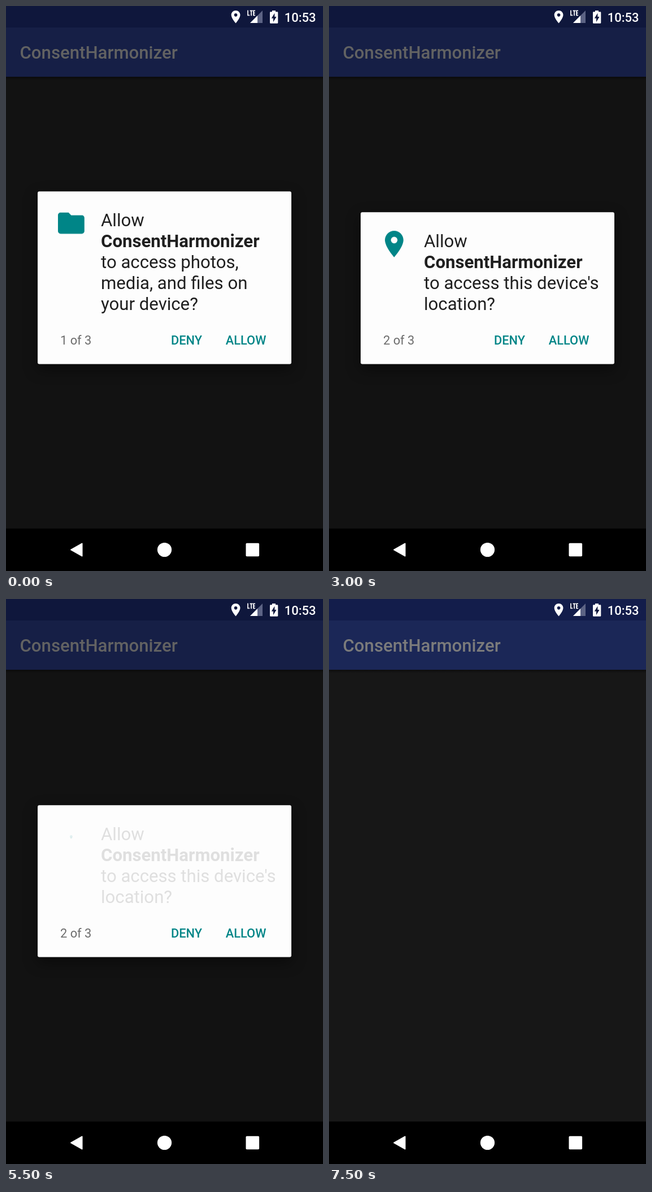
Recreate the animation shown at these times as an HTML page. Size 561 by 998 pixels, loop 8 s.

```html
<!DOCTYPE html>
<html lang="en">
<head>
<meta charset="utf-8">
<title>Permission dialogs</title>
<style>
  html, body { margin: 0; width: 100%; height: 100%; overflow: hidden; background: #000; }
  svg { display: block; width: 561px; height: 998px; font-family: Roboto, sans-serif; }
  .title, .button, .clock { font-weight: 500; }
  .title { font-size: 31.17px; fill: #7b7b7b; }
  .clock { font-size: 22px; fill: #fff; }
  .message { font-size: 31.17px; fill: #1f1f1f; }
  .message .app { font-weight: 700; }
  .button, .count { font-size: 21.8px; }
  .button, .icon { fill: #008587; }
  .count { fill: #6b6b6b; }
  .card { fill: #fdfdfd; filter: drop-shadow(0 9px 13px rgba(0, 0, 0, .45)); }
  .icon { transform-box: fill-box; transform-origin: center; }

  /* Everything changes in hard half-second steps: 6.25% each. */
  .dim, .dialog, .message, .icon, .press, .touch, .slide { animation: 8s step-end infinite; }
  .dim { animation-name: dim; }
  .files { animation-name: files; }
  .place { animation-name: place; }
  .calls { animation-name: calls; }
  .files .message { animation-name: fade1; }
  .place .message { animation-name: fade2; }
  .files .icon { animation-name: shrink1; }
  .place .icon { animation-name: shrink2; }
  .press { animation-name: press; }
  .slide { animation-name: slide; }
  .touch { animation-name: touch; }

  @keyframes dim { 0% { opacity: .2 } 93.75%, 100% { opacity: 0 } }
  @keyframes files { 0% { visibility: visible } 37.5%, 100% { visibility: hidden } }
  @keyframes place { 0% { visibility: hidden } 37.5% { visibility: visible } 75%, 100% { visibility: hidden } }
  @keyframes calls { 0% { visibility: hidden } 75% { visibility: visible } 93.75%, 100% { visibility: hidden } }
  @keyframes fade1 { 0% { opacity: 1 } 31.25%, 100% { opacity: .13 } }
  @keyframes fade2 { 0% { opacity: 1 } 68.75%, 100% { opacity: .13 } }
  @keyframes shrink1 { 0% { opacity: 1; transform: none } 31.25%, 100% { opacity: .16; transform: scale(.13) } }
  @keyframes shrink2 { 0% { opacity: 1; transform: none } 68.75%, 100% { opacity: .16; transform: scale(.13) } }
  @keyframes press {
    0% { opacity: 0 } 31.25% { opacity: 1 } 37.5% { opacity: 0 }
    68.75% { opacity: 1 } 75%, 100% { opacity: 0 }
  }
  @keyframes slide { 0% { transform: translateX(7.5px) } 81.25%, 100% { transform: none } }
  @keyframes touch {
    0% { opacity: 0; transform: translate(409.5px, 582px) }
    62.5% { opacity: 1; transform: translate(409.5px, 582px) }
    68.75% { opacity: 0; transform: translate(324px, 582px) }
    87.5% { opacity: 1; transform: translate(324px, 582px) }
    93.75%, 100% { opacity: 0; transform: translate(324px, 582px) }
  }
</style>
</head>
<body>
<svg viewBox="0 0 561 998">
  <defs>
    <linearGradient id="barShade" x2="0" y2="1">
      <stop stop-opacity=".45"/>
      <stop offset="1" stop-opacity="0"/>
    </linearGradient>
    <path id="pin" d="M12 2C8.13 2 5 5.13 5 9c0 5.25 7 13 7 13s7-7.75 7-13c0-3.87-3.13-7-7-7zm0 9.5a2.5 2.5 0 0 1 0-5 2.5 2.5 0 0 1 0 5z"/>
    <g id="actions">
      <rect class="press" x="376.5" y="561" width="97" height="55.5" rx="3" fill="#e8e8e8"/>
      <text class="button" x="292" y="597.5">DENY</text>
      <text class="button" x="388.7" y="597.5">ALLOW</text>
    </g>
  </defs>

  <!-- App behind the dialogs -->
  <rect width="561" height="998" fill="#171717"/>
  <rect width="561" height="38" fill="#131d4b"/>
  <rect y="38" width="561" height="87" fill="#1b2757"/>
  <rect y="125" width="561" height="6" fill="url(#barShade)"/>
  <text class="title" x="24.5" y="93">ConsentHarmonizer</text>
  <rect class="dim" width="561" height="923"/>

  <!-- Status bar -->
  <g fill="#fff">
    <use href="#pin" transform="translate(393 5.7) scale(1.13)"/>
    <path d="M454 8V30H432Z" fill="#5c6384"/>
    <path d="M445 17V30H432Z"/>
    <path d="M426 6H442V18.5H426Z" fill="#0f173c"/>
    <path d="M428 7.5V16.3H431.2M431.6 8.4H436.6M434.1 8.4V17.2M441 8.4H438V16.3H441M438 12.3H440.6" fill="none" stroke="#fff" stroke-width="1.7"/>
    <path d="M471 8H477V10.3H480A1.3 1.3 0 0 1 481.3 11.6V29.5A1.3 1.3 0 0 1 480 30.8H468.3A1.3 1.3 0 0 1 467 29.5V11.6A1.3 1.3 0 0 1 468.3 10.3H471Z"/>
    <path d="M475.4 12.5L469.8 21.8H473V28.3L478.6 19H475.4Z" fill="#0f173c"/>
    <text class="clock" x="492.7" y="27.5">10:53</text>
  </g>

  <!-- Navigation bar -->
  <rect y="923" width="561" height="75"/>
  <g fill="#fff">
    <path d="M115 960.5L134.5 949.5V971.5Z" stroke="#fff" stroke-width="2" stroke-linejoin="round"/>
    <circle cx="280.5" cy="960.5" r="12.6"/>
    <rect x="424.5" y="948.7" width="23.6" height="23.6" rx="1.8"/>
  </g>

  <g class="dialog files">
    <rect class="card" x="56" y="327.5" width="449" height="305" rx="3"/>
    <g transform="translate(87.3 355.5) scale(2.338)">
      <path class="icon" d="M10 4H4c-1.1 0-2 .9-2 2v12c0 1.1.9 2 2 2h16c1.1 0 2-.9 2-2V8c0-1.1-.9-2-2-2h-8z"/>
    </g>
    <text class="message">
      <tspan x="168" y="389">Allow</tspan>
      <tspan class="app" x="168" y="426">ConsentHarmonizer</tspan>
      <tspan x="168" y="463">to access photos,</tspan>
      <tspan x="168" y="500">media, and files on</tspan>
      <tspan x="168" y="537">your device?</tspan>
    </text>
    <text class="count" x="96" y="597.5">1 of 3</text>
    <use href="#actions"/>
  </g>

  <g class="dialog place">
    <rect class="card" x="56" y="364.3" width="449" height="268.2" rx="3"/>
    <g transform="translate(87.3 392.4) scale(2.338)">
      <use class="icon" href="#pin"/>
    </g>
    <text class="message">
      <tspan x="168" y="426">Allow</tspan>
      <tspan class="app" x="168" y="463">ConsentHarmonizer</tspan>
      <tspan x="168" y="500">to access this device's</tspan>
      <tspan x="168" y="537">location?</tspan>
    </text>
    <text class="count" x="96" y="597.5">2 of 3</text>
    <use href="#actions"/>
  </g>

  <g class="dialog calls">
    <rect class="card" x="56" y="364.3" width="449" height="268.2" rx="3"/>
    <g class="slide">
      <g transform="translate(87.3 392.4) scale(2.338)">
        <path class="icon" d="M6.62 10.79c1.44 2.83 3.76 5.14 6.59 6.59l2.2-2.2c.27-.27.67-.36 1.02-.24 1.12.37 2.33.57 3.57.57.55 0 1 .45 1 1V20c0 .55-.45 1-1 1C10.61 21 3 13.39 3 4c0-.55.45-1 1-1h3.5c.55 0 1 .45 1 1 0 1.25.2 2.45.57 3.57.11.35.03.74-.25 1.02z"/>
      </g>
      <text class="message">
        <tspan x="168" y="426">Allow</tspan>
        <tspan class="app" x="168" y="463">ConsentHarmonizer</tspan>
        <tspan x="168" y="500">to make and manage</tspan>
        <tspan x="168" y="537">phone calls?</tspan>
      </text>
    </g>
    <text class="count" x="96" y="597.5">3 of 3</text>
    <use href="#actions"/>
  </g>

  <circle class="touch" r="17.3" fill="#fff" fill-opacity=".65" stroke="#cfd3e4" stroke-width="2.4"/>
</svg>
</body>
</html>
```
